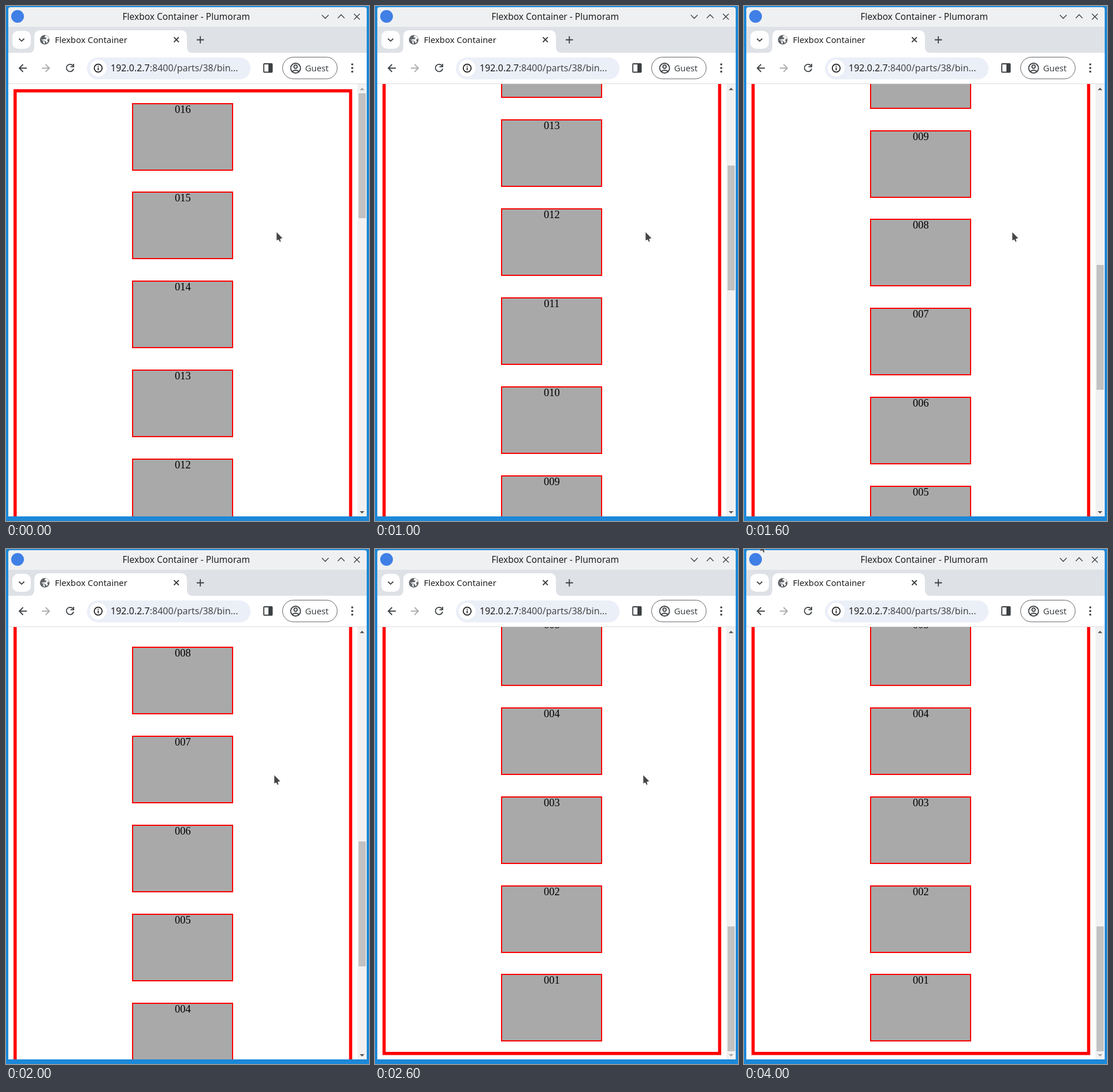
These frames come from a looping animation (628 px wide and 891 px high, 4100 ms). An HTML page:

```html
<!DOCTYPE html>
<html lang="en">
<head>
<meta charset="utf-8">
<title>Flexbox Container</title>
<style>
  html, body { margin: 0; width: 100%; height: 100%; overflow: hidden; }
  svg { display: block; }
  text { font-family: "Noto Sans", sans-serif; fill: #1f1f1f; white-space: pre; }
  #page text { font: 18.5px "Liberation Serif", serif; fill: #000; text-anchor: middle; }
  .line { fill: none; stroke: #3c4043; stroke-width: 1.8; }
</style>
</head>
<body>
<svg width="628" height="891" viewBox="0 0 628 891">
  <defs>
    <clipPath id="view"><rect x="4" y="135" width="604" height="748"/></clipPath>
  </defs>
  <rect width="628" height="891" fill="#1c88d8"/>

  <!-- title bar -->
  <path d="M4 40V6q0-4 4-4H620q4 0 4 4V40z" fill="#eff0f1"/>
  <circle cx="20" cy="18" r="11" fill="#3f7fe6"/>
  <text x="201.5" y="24" font-size="15.5">Flexbox Container - Plumoram</text>
  <path class="line" style="stroke-width:1.3" d="M546.500 15.500l5.800 6 5.800-6M574 21l5.800-6 5.800 6M602 13.500l10 10m0-10l-10 10"/>

  <!-- tab strip -->
  <rect x="4" y="36" width="620" height="45" fill="#dee1e6"/>
  <rect x="11" y="43" width="32" height="31" rx="10" fill="#fff"/>
  <path class="line" stroke-width="2" d="M22.500 56.500l4.500 4.300 4.500-4.300"/>
  <path d="M39 81q10 0 10-10V53q0-11 11-11H302q11 0 11 11V71q0 10 10 10z" fill="#fff"/>
  <circle cx="67" cy="58.500" r="8.300" fill="#5f6368"/>
  <path d="M60.500 57l4 4v3l2.500 1.500v-4l-3-2v-2h5l1-3h-3v-2.500l3-1q4 2 4 6l-3 1 1.500 4-2.500 2-1.500-3-3-1.500" fill="#fff"/>
  <text x="84.500" y="64" font-size="14.8">Flexbox Container</text>
  <path class="line" d="M290.500 54l8.500 8.500m0-8.500l-8.500 8.500M330 58.500h12.500M336.200 52.300v12.500"/>

  <!-- toolbar -->
  <rect x="4" y="81" width="620" height="54" fill="#fff"/>
  <rect x="4" y="134" width="620" height="1" fill="#dadce0"/>
  <path class="line" d="M36 107.500H23.500M29.500 101l-6.500 6.500 6.500 6.500"/>
  <path class="line" style="stroke:#a9abae" d="M62 107.500H74.500M68.500 101l6.500 6.500-6.500 6.500"/>
  <path class="line" d="M116 103.500a6.300 6.300 0 1 0 1 5M117 100v5.200h-5.500"/>
  <rect x="140" y="89" width="283" height="38" rx="19" fill="#ebeff8"/>
  <circle cx="159.500" cy="107.500" r="14.500" fill="#fff"/>
  <circle class="line" style="stroke:#1f1f1f" cx="159.500" cy="107.500" r="6.800"/>
  <path class="line" style="stroke:#1f1f1f" d="M159.500 106.500v4.800M159.500 103.500v1.800"/>
  <text x="181" y="113" font-size="16">192.0.2.7<tspan fill="#474747">:8400/parts/38/bin...</tspan></text>
  <rect class="line" x="446" y="100" width="14.500" height="14.500" rx="1"/>
  <rect x="454" y="100" width="6.500" height="14.500" fill="#3c4043"/>
  <rect x="478.500" y="88.500" width="94.500" height="37.500" rx="18.700" fill="#fff" stroke="#5f6368"/>
  <circle class="line" stroke-width="1.6" cx="501" cy="107.500" r="8.500"/>
  <circle class="line" stroke-width="1.6" cx="501" cy="105" r="2.800"/>
  <path class="line" stroke-width="1.6" d="M495 113.500q6-5 12 0"/>
  <text x="517.500" y="113" font-size="14.8" style="fill:#3c4043">Guest</text>
  <g fill="#3c4043"><circle cx="599" cy="101" r="1.800"/><circle cx="599" cy="107.300" r="1.800"/><circle cx="599" cy="113.600" r="1.800"/></g>

  <!-- page -->
  <rect x="4" y="135" width="620" height="748" fill="#fff"/>
  <g clip-path="url(#view)"><g id="page">
    <rect x="15.750" y="146.750" width="580.500" height="2466" fill="none" stroke="red" stroke-width="5.500"/>
  </g></g>

  <!-- scrollbar -->
  <rect x="608" y="135" width="15.500" height="748" fill="#f1f1f1"/>
  <rect id="thumb" x="610" y="151" width="12.500" height="216" fill="#c1c1c1"/>
  <path id="up" d="M612 145.500l4-4 4 4z"/>
  <path id="down" d="M612 874l4 4 4-4z"/>

  <path id="cursor" d="M0 0V14.800L3.500 13.200 5.300 16.500Q6.600 18 7.400 16.200L6.400 12 10.500 10.800z" fill="#454647" stroke="#fff" stroke-opacity=".6" stroke-width=".6"/>
</svg>
<script>
const LOOP = 4100, END = 1740;
const $ = id => document.getElementById(id);

// [time, scroll offset]: each wheel burst eases out in 100 ms steps
const scrolls = [
  [0, 0], [400, 72], [500, 112], [600, 122], [700, 125],
  [900, 270], [1000, 433], [1100, 520], [1200, 549],
  [1400, 690], [1500, 900], [1600, 1030], [1700, 1041],
  [1900, 1115], [2000, 1229], [2100, 1400], [2200, 1490],
  [2400, 1650], [2600, END]
];
// [time, x, y] of the pointer tip
const moves = [
  [0, 468, 391], [1400, 464, 391], [3500, 440, 362], [3600, 350, 268],
  [3700, 220, 152], [3800, 95, 58], [3900, 10, 10], [4000, 28, -11]
];
const at = (list, t) => list.findLast(step => step[0] <= t);

function add(tag, attrs, text = "") {
  const el = document.createElementNS("http://www.w3.org/2000/svg", tag);
  for (const key in attrs) el.setAttribute(key, attrs[key]);
  el.textContent = text;
  $("page").append(el);
}

for (let i = 0; i < 16; i++) {
  const y = Math.round(167.6 + 153.85 * i);
  add("rect", { x: 218, y, width: 175, height: 117, fill: "red" });
  add("rect", { x: 220, y: y + 2, width: 171, height: 113, fill: "#a9a9a9" });
  add("text", { x: 305.8, y: y + 17 }, String(16 - i).padStart(3, "0"));
}

function draw() {
  const t = performance.now() % LOOP;
  const [, scroll] = at(scrolls, t);
  const [, x, y] = at(moves, t);
  $("page").setAttribute("transform", `translate(0 ${-scroll})`);
  $("thumb").setAttribute("y", 151 + Math.round(scroll / END * 502));
  $("up").setAttribute("fill", scroll > 0 ? "#505050" : "#a3a3a3");
  $("down").setAttribute("fill", scroll < END ? "#505050" : "#a3a3a3");
  $("cursor").setAttribute("transform", `translate(${x} ${y})`);
  requestAnimationFrame(draw);
}
draw();
</script>
</body>
</html>
```
